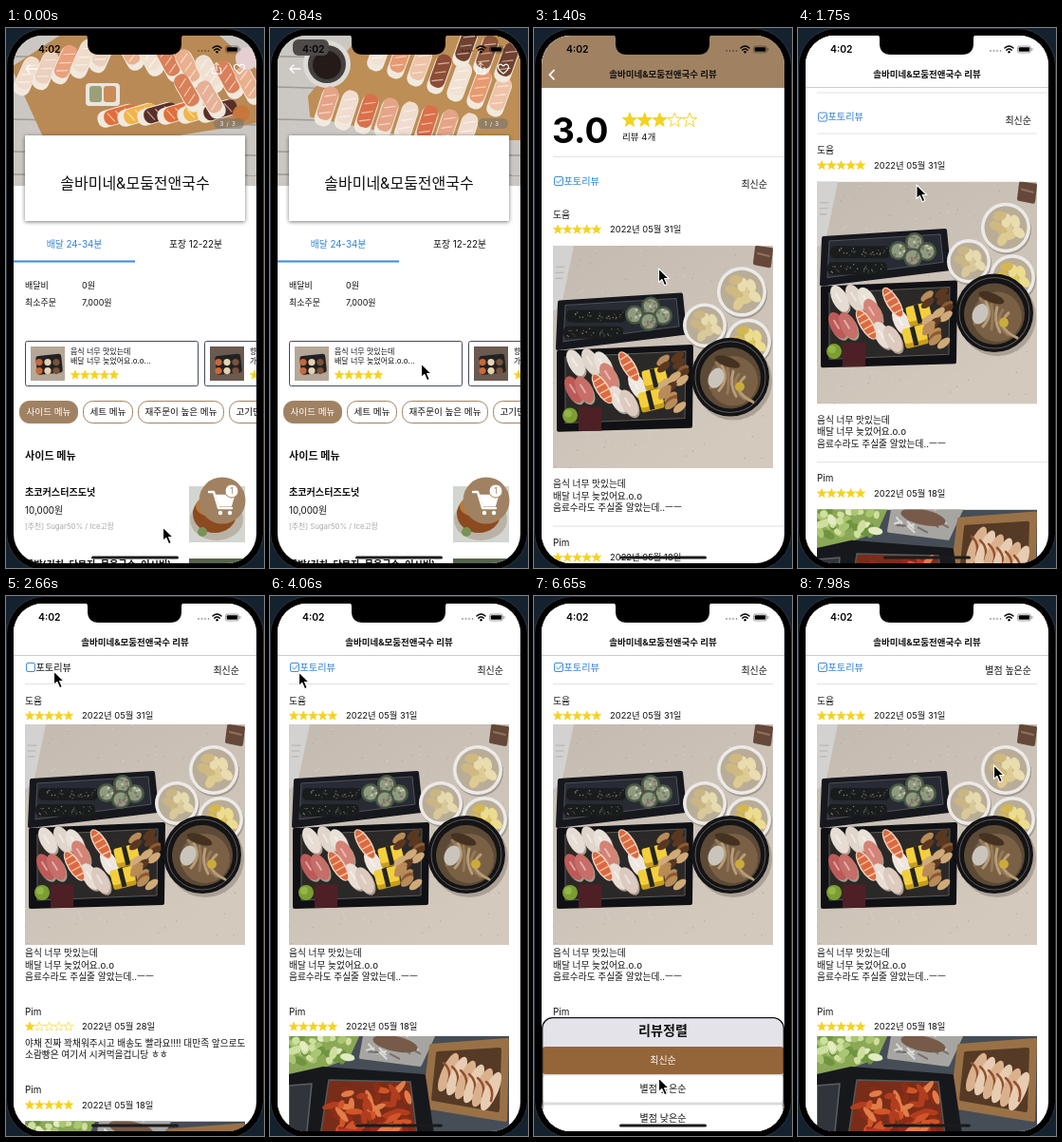
An HTML page that plays this animation: 272 by 568 pixels, repeating every 8000 ms.

```html
<!DOCTYPE html>
<html lang="ko">
<head>
<meta charset="utf-8">
<style>
html, body { margin: 0; width: 100%; height: 100%; overflow: hidden; background: #14202c; }
svg { display: block; }
#stage { width: 272px; height: 568px; }
text { font-family: Inter, "Noto Sans CJK KR", "Noto Sans CJK", sans-serif; white-space: pre; }
</style>
</head>
<body>
<svg id="stage" viewBox="0 0 272 568"></svg>
<script>
const LOOP = 8000, STEP = 70;
const BROWN = '#a08262', BLUE = '#2f80d8', YELLOW = '#f4d21f';
const SHOP = '솔바미네&amp;모둠전앤국수';

// ---- drawing helpers
const rect = (x, y, w, h, fill, r = 0, more = '') =>
  `<rect x="${x}" y="${y}" width="${w}" height="${h}" rx="${r}" fill="${fill}" ${more}/>`;
const circle = (x, y, r, fill, more = '') => `<circle cx="${x}" cy="${y}" r="${r}" fill="${fill}" ${more}/>`;
const oval = (x, y, rx, ry, fill, turn = 0) =>
  `<ellipse rx="${rx}" ry="${ry}" fill="${fill}" transform="translate(${x} ${y}) rotate(${turn})"/>`;
const poly = (points, fill, edge = fill, w = 4) =>
  `<polygon points="${points}" fill="${fill}" stroke="${edge}" stroke-width="${w}" stroke-linejoin="round"/>`;
const line = (d, color, w = 1) =>
  `<path d="${d}" fill="none" stroke="${color}" stroke-width="${w}" stroke-linecap="round" stroke-linejoin="round"/>`;
const rule = (x1, x2, y, color = '#e2e2e2') => rect(x1, y, x2 - x1, 1, color);
const group = (id, body, more = '') => `<g id="${id}" ${more}>${body}</g>`;
const shift = (x, y, body) => `<g transform="translate(${x} ${y})">${body}</g>`;
const repeat = (n, draw) => Array.from({ length: n }, (_, i) => draw(i)).join('');
// y is the middle of the line
const text = (x, y, str, size, { fill = '#111', weight = 400, anchor = 'start' } = {}) =>
  `<text x="${x}" y="${(y + size * .36).toFixed(2)}" font-size="${size}" fill="${fill}" font-weight="${weight}" text-anchor="${anchor}">${str}</text>`;

let seed = 7;
const random = () => (seed = seed * 16807 % 2147483647) / 2147483647;
const between = (a, b) => +(a + random() * (b - a)).toFixed(1);
const pick = list => list[Math.floor(random() * list.length)];

function star(x, y, r, full) {
  const pts = Array.from({ length: 10 }, (_, i) => {
    const a = (i / 5 - .5) * Math.PI, d = i % 2 ? r * .42 : r;
    return `${(x + d * Math.cos(a)).toFixed(2)},${(y + d * Math.sin(a)).toFixed(2)}`;
  }).join(' ');
  return `<polygon points="${pts}" fill="${full ? YELLOW : '#fff'}" stroke="${YELLOW}" stroke-width="${r * .12}"/>`;
}
const stars = (x, y, pitch, score) => repeat(5, i => star(x + pitch * (i + .5), y, pitch * .5, i < score));

// ---- food pictures
const nigiri = (x, y, turn, color) => `<g transform="translate(${x} ${y}) rotate(${turn})">
  ${rect(-9, -20, 18, 42, '#f1e9de', 8)}${rect(-8, -21, 16, 36, color, 7)}
  ${line('M-5-9l10-5M-5 1l10-5M-5 10l10-5', '#ffffff90', 1.2)}</g>`;
const nigiriRow = (n, x, y, dx, dy, turn, colors) =>
  repeat(n, i => nigiri(x + dx * i, y + dy * i, turn, colors[i % colors.length]));
const planks = ox => rect(ox, 8, 256, 158, '#cbc8c3') +
  [30, 62, 96, 130, 154].map(y => line(`M${ox} ${y}l256 ${y % 9}`, '#9d9a95', 1.5)).join('');

const heroFirst = planks(8) + poly('8,42 60,8 222,8 264,46 264,98 150,116 40,112', '#b98a55') +
  nigiriRow(5, 22, 50, 20, -6, 24, ['#f0dccb', '#ead0bd', '#e8a17c']) +
  nigiriRow(7, 130, 24, 21, 6, -28, ['#e9b08e', '#f0e0d0', '#d9805a']) +
  rect(84, 58, 36, 24, '#e9e5df', 4) + rect(88, 61, 13, 17, '#9aa077', 3) + rect(103, 61, 13, 17, '#c98b57', 3) +
  nigiriRow(6, 118, 92, 21, -1, 74, ['#e06f3c', '#f0b54a', '#5a2f28']) +
  nigiriRow(2, 192, 68, 24, 7, -30, ['#d98058', '#e6b197']) +
  circle(254, 32, 12, '#e6cfd2') + circle(248, 90, 9, '#c8763c');
const heroSecond = planks(264) + poly('354,8 520,8 520,116 420,116 300,92 298,72', '#bd8e55') +
  circle(316, 38, 25, '#dedbd7') + circle(316, 38, 20, '#44403e') + circle(316, 39, 15, '#241a17') +
  rect(280, 12, 38, 17, '#4d4a48', 6) +
  nigiriRow(8, 316, 82, 21, 4, 18, ['#e5a487', '#f0ddd0', '#d9704a']) +
  nigiriRow(7, 372, 24, 21, 8, 20, ['#f1e2d4', '#e89a70', '#eec3a8', '#8c4d35']) +
  nigiriRow(3, 462, 20, 22, 8, 20, ['#70412e', '#8b5439']);

const cup = (x, y, r, colors) => circle(x + 1, y + 2, r, '#a59a8f') + circle(x, y, r, '#eceae8') +
  circle(x, y, r - 3.5, '#b9ad98') +
  repeat(9, i => oval(x + Math.cos(i * 2.4) * r * .17 * Math.sqrt(i * 1.4), y + Math.sin(i * 2.4) * r * .17 * Math.sqrt(i * 1.4),
    r * .28, r * .19, colors[i % colors.length], i * 50));
const shrimp = (x, y) => oval(x, y, 7, 18, '#f0d9c6', -32) + oval(x, y, 5.5, 17, '#dc6a41', -32) +
  line(`M${x - 9} ${y - 7}l8-5M${x - 6} ${y - 1}l9-5M${x - 2} ${y + 5}l9-5M${x + 2} ${y + 11}l8-4`, '#f4cbb0', 1.4);
const tamago = (x, y) => `<g transform="translate(${x} ${y}) rotate(-14)">${rect(-12, -9, 25, 20, '#c99d1c', 3)}` +
  `${rect(-12, -10, 25, 16, '#f3cf3b', 3)}${rect(-3, -10, 5, 20, '#23241f')}</g>`;

function sushiPhoto() {
  const specks = repeat(160, () => circle(between(0, 232), between(0, 232), .7, pick(['#b3a79b', '#ded5cb'])));
  const roll = (x, y) => rect(x, y, 63, 13, '#191c1c', 5) +
    repeat(30, () => circle(between(x + 3, x + 60), between(y + 2, y + 11), .7, pick(['#5d6158', '#8b8a7a', '#3d443c'])));
  return `<linearGradient id="table" x2=".6" y2="1"><stop stop-color="#c3bab1"/><stop offset="1" stop-color="#d3c9bd"/></linearGradient>` +
    rect(0, 0, 232, 232, 'url(#table)') + specks +
    poly('0,0 20,0 7,62 0,66', '#d3d2d0') + line('M3 22h9M3 28h8M3 34h7', '#b3b0ae') +
    poly('215,2 230,4 228,21 213,18', '#65483a') + line('M216 8l12 3', '#94705c', 2) +
    poly('7,59 135,51 139,91 5,107', '#17181e') + poly('13,62 130,55 133,84 11,100', '#282b33', '#4d5159', 1) +
    roll(14, 67) + roll(11, 84) +
    [[86, 72], [103, 63], [116, 73], [101, 79]].map(([x, y]) => circle(x, y, 10, '#4a5746') + circle(x, y, 7.5, '#8e9b7f') +
      repeat(7, () => circle(x + between(-6, 6), y + between(-6, 6), 1.4, pick(['#c5c2a8', '#6f7a5e', '#8e6c70'])))).join('') +
    poly('6,111 146,105 145,188 6,192', '#101115') + poly('13,116 140,110 139,180 13,185', '#2b2927', '#5c5a58', 1) +
    [[24, 122, '#e5ddd4'], [40, 121, '#e0d5cb'], [53, 124, '#e9e2d9'], [22, 150, '#bd5a58'], [33, 150, '#c66e67'], [59, 136, '#d48476'],
      [69, 160, '#e9ddd5'], [80, 164, '#ddcabf'], [89, 146, '#efe7df']]
      .map(([x, y, c]) => oval(x + 1.5, y + 2, 8, 15, '#a99c8f', -28) + oval(x, y, 8, 15, c, -28) + line(`M${x - 4} ${y - 5}l5 8`, '#ffffff70', 2)).join('') +
    shrimp(52, 149) + shrimp(80, 126) + tamago(107, 138) + tamago(103, 161) +
    repeat(16, i => oval(between(116, 138), 116 + i * 3.5, 8, 4, pick(['#8c5a31', '#b98b59', '#5b3820', '#d0aa78']), -38)) +
    circle(18, 177, 8, '#7c9e31') + circle(16, 175, 4, '#94b548') + rect(27, 168, 24, 25, '#4d2025') +
    cup(199, 48, 26, ['#decb93', '#cfb981', '#e9dcae']) + cup(160, 83, 23, ['#d9c899', '#cab685', '#e6daae']) +
    cup(206, 100, 24, ['#e0c75e', '#d5b750', '#ecdc8e']) +
    circle(190, 141, 41, '#aca196') + circle(187, 137, 41, '#141416') + circle(187, 137, 37, '#141416', 'stroke="#5c5a58" stroke-width="1"') +
    circle(187, 138, 32, '#5d4a36') + circle(190, 141, 26, '#7a6044') +
    repeat(6, i => line(`M${172 + i * 6} ${122 + i * 3}q${14 - i * 6} 14 ${i * 3 - 6} 26`, i % 2 ? '#b79c77' : '#94795a', 3)) +
    oval(172, 138, 8, 11, '#c9c5bd', 25) + circle(197, 147, 5, '#c9ac3c') + oval(184, 121, 14, 5, '#44311f', 20);
}
function chickenPhoto() {
  return rect(0, 0, 232, 232, '#454d57') +
    poly('0,0 72,0 62,22 34,32 0,38', '#8aa856') +
    repeat(40, () => oval(between(0, 64), between(0, 27), between(3, 8), 4, pick(['#cfdf9e', '#a9c671', '#6f9440', '#e3ebc2']), between(0, 180))) +
    poly('80,0 152,0 138,30 76,22', '#a7a5a2') +
    repeat(16, () => line(`M${between(82, 140)} ${between(0, 20)}l${between(4, 12)} ${between(-4, 7)}`, pick(['#dddbd8', '#77716c']), 2)) +
    oval(112, 8, 24, 8, '#775a49', 12) +
    poly('150,10 230,4 228,88 142,74', '#9a7146') + poly('157,18 222,14 220,78 152,66', '#553a26') +
    repeat(6, i => oval(168 + i * 9, 38 + i * 4, 7, 22, i % 2 ? '#e6cdb2' : '#d9b18d', 24) +
      line(`M${163 + i * 9} ${28 + i * 4}q9 8 5 20`, '#95502f', 2.5)) +
    poly('0,42 36,34 142,42 152,110 0,110', '#17181c') + poly('42,46 128,48 136,112 32,112', '#792d18', '#55585d', 1.5) +
    repeat(60, () => oval(between(44, 126), between(53, 112), between(5, 11), 3.2, pick(['#d2552a', '#b23d1e', '#e07d48', '#8e2d17']), between(0, 180))) +
    poly('0,52 24,50 18,110 0,110', '#30343b', '#5a5e64', 1.5);
}
const food = (x, y, size, base) => rect(x, y, size, size, base) +
  rect(x + 4, y + size * .3, size - 9, size * .55, '#222225', 3, `transform="rotate(-6 ${x} ${y})"`) +
  repeat(6, i => circle(x + 9 + i % 3 * 9, y + size * .46 + (i > 2) * 9, 3.6, ['#c8693c', '#e6d2b0', '#79523a'][i % 3]));

// ---- menu page
const chip = (x, w, label, on) => rect(x + .5, 392.5, w, 23, on ? BROWN : '#fff', 10, `stroke="${BROWN}"`) +
  text(x + 7.5, 404, label, 9.6, { fill: on ? '#fff' : '#111' });
const cart = circle(228, 497, 24.5, BROWN) +
  line('M214 488h5l5 17h14M220 492h20l-3 10h-14', '#fff', 2.4) +
  `<path d="M221 492h19l-3 9h-13z" fill="#fff"/>` + circle(226, 510, 2.2, '#fff') + circle(236, 510, 2.2, '#fff') +
  circle(238, 487, 7, '#fff', `stroke="${BROWN}"`) + text(238, 487, '1', 9, { fill: BROWN, anchor: 'middle' });

const menuPage = rect(8, 8, 256, 556, '#fff') +
  `<svg x="8" y="8" width="256" height="158" viewBox="8 8 256 158">${group('hero', heroFirst + heroSecond)}</svg>` +
  line('M32 43H21M25 39l-4 4 4 4', '#fff', 1.3) +
  line('M219 42h-1.500v6h9v-6h-1.500M222 45v-8M219.500 39l2.500-2.500 2.500 2.500', '#fff', 1) +
  line('M246 48c-9-6-5-11-1.800-9.500l1.800 1.500 1.800-1.500c3.200-1.500 7.200 3.500-1.800 9.500z', '#fff', 1.2) +
  rect(219, 95, 32, 11, '#77737199', 5.5) +
  `<text id="pageNo" x="234" y="102.500" font-size="6" fill="#fff" text-anchor="middle" letter-spacing=".8"></text>` +
  rect(20, 113, 232, 90, '#fff', 1, 'style="filter:drop-shadow(0 1px 2px #0008)"') +
  text(136, 163, SHOP, 16, { anchor: 'middle' }) +
  text(72, 227, '배달 24-34분', 9.8, { fill: BLUE, anchor: 'middle' }) + text(200, 227, '포장 12-22분', 9.8, { anchor: 'middle' }) +
  rect(8, 244.5, 128, 2, '#3c87e6') +
  text(20, 271, '배달비', 9) + text(80, 271, '0원', 9) + text(20, 289, '최소주문', 9) + text(80, 289, '7,000원', 9) +
  rect(20.5, 329.5, 182, 47, '#fff', 2, 'stroke="#444a55"') + food(26, 335, 36, '#b5a797') +
  text(68, 340, '음식 너무 맛있는데', 8) + text(68, 350.5, '배달 너무 늦었어요.o.o...', 8) + stars(68, 365, 10.2, 5) +
  rect(209.5, 329.5, 182, 47, '#fff', 2, 'stroke="#444a55"') + food(215, 335, 36, '#6a5a50') +
  text(257, 340, '향', 8) + text(257, 350.5, '가', 8) + stars(257, 365, 10.2, 5) +
  chip(14, 61, '사이드 메뉴', true) + chip(81, 52, '세트 메뉴') + chip(139, 90, '재주문이 높은 메뉴') + chip(235, 60, '고기만 메뉴') +
  text(20, 450, '사이드 메뉴', 11.1, { weight: 700 }) +
  text(20, 488, '초코커스터즈도넛', 10.1, { weight: 700 }) + text(20, 507, '10,000원', 9.8) +
  text(20, 524, '[추천] Sugar50% / Ice고정', 7.8, { fill: '#aaa' }) +
  rect(193, 482, 59, 59, '#d3d6d0') + oval(222, 517, 28, 22, '#b9b2a6') + oval(220, 511, 23, 20, '#8c4a20') + oval(217, 503, 17, 11, '#b47a40') + circle(207, 530, 5, '#789256') +
  text(20, 564, '국밥(김치, 단무지, 묵은국수, 어시비)', 10.1, { weight: 700 }) +
  rect(193, 558, 59, 8, '#56644d') + cart;

// ---- review page
function review(y, name, score, day, { photo, lines = [], gap = 9 }) {
  const height = gap > 10 ? 234 : 232, top = y + 16 + gap;
  const first = photo ? top + height + gap : y + 33.5;
  return text(20, y, name, 9.8) + stars(20, y + 16, 10.2, score) + text(80, y + 16, `2022년 05월 ${day}일`, 9.4) +
    (photo ? `<svg x="20" y="${top}" width="232" height="${height}" viewBox="0 0 232 232" preserveAspectRatio="none">${photo}</svg>` : '') +
    lines.map((s, i) => text(20, first + i * 12.3, s, 9.7)).join('');
}
const sushi = sushiPhoto(), chicken = chickenPhoto();
const meal = ['음식 너무 맛있는데', '배달 너무 늦었어요.o.o', '음료수라도 주실줄 알았는데..ㅡㅡ'];
const salad = ['야채 진짜 꽉채워주시고 배송도 빨라요!!!! 대만족 앞으로도', '소람빵은 여기서 시켜먹을겁니당 ㅎㅎ'];
const topReview = review(110, '도윰', 5, 31, { photo: sushi, lines: meal });

const looseList = review(196, '도윰', 5, 31, { photo: sushi, lines: meal, gap: 17 }) + rule(20, 264, 523.5) +
  review(541, 'Pim', 5, 18, { photo: chicken, gap: 17 });
const fullList = shift(0, 86, topReview + review(437, 'Pim', 1, 28, { lines: salad }) +
  review(519.5, 'Pim', 5, 18, { photo: chicken, gap: 17 }));
const photoList = shift(0, 86, topReview + review(437, 'Pim', 5, 18, { photo: chicken, gap: 10 }));

const filterBar = rect(8, 140, 256, 39, '#fff') + group('barLine', rule(20, 252, 178)) +
  rect(21.5, 156.5, 9, 9, '#fff', 1.5, `stroke="${BLUE}" stroke-width=".9"`) + group('tick', line('M23.700 161l1.800 2.200 3.800-4.400', BLUE, .9)) +
  `<text id="filter" x="31.500" y="164.700" font-size="10.200">포토리뷰</text>` +
  `<text id="sort" x="246" y="168.300" font-size="10" fill="#111" text-anchor="end"></text>`;

const reviewPage = rect(8, 8, 256, 556, '#fff') +
  group('scroll',
    text(19, 108, '3.0', 37, { weight: 700, fill: '#000' }) + stars(93, 97, 15.8, 3) + text(93, 115, '리뷰 4개', 9.6) + rule(20, 264, 135) +
    group('loose', looseList) + group('full', fullList) + group('photos', photoList) + filterBar) +
  `<rect id="bar" x="8" y="8" width="256" height="55"/>` + group('navLine', rule(8, 264, 62, '#ccc')) +
  line('M21 44.500l-4.500 4.700 4.500 4.700', '#fff', 1.8) + text(136, 49, SHOP + ' 리뷰', 9.5, { weight: 700, anchor: 'middle' });

const option = (y, label, on) => rect(8.5, y, 255, 29, on ? '#946538' : '#fff', 4, on ? '' : 'stroke="#dcdcdc"') +
  text(136, y + 14.5, label, 10, { fill: on ? '#fff' : '#111', anchor: 'middle' });
const sheet = rect(8.5, 443.5, 255, 150, '#e4e3e9', 11) +
  rect(8, 474, 256, 100, '#d9d9db') +
  text(136, 457, '리뷰정렬', 14.1, { weight: 700, anchor: 'middle' }) +
  option(474, '최신순', true) + option(504, '별점 높은순') + option(535, '별점 낮은순') +
  rect(8.7, 443.7, 254.6, 150, 'none', 11, 'stroke="#111" stroke-width="1.300"');

const statusBar = text(34, 22.5, '4:02', 10.4, { weight: 600, fill: '#000' }) +
  repeat(4, i => circle(203 + i * 3.5, 24, .9, '#0006')) +
  line('M218 21q4.500-4 9 0M219.800 23.200q2.700-2.400 5.400 0', '#000', 1.5) + circle(222.5, 25.2, 1.2, '#000') +
  rect(231.5, 19, 14, 7, 'none', 2, 'stroke="#0007" stroke-width=".8"') + rect(232.7, 20.2, 11.6, 4.6, '#000', 1) + rect(246.4, 21.3, 1, 2.5, '#0007');

document.getElementById('stage').innerHTML =
  `<clipPath id="screen"><rect x="8" y="8" width="256" height="555" rx="31"/></clipPath>` +
  rect(0, 0, 272, 568, '#14222f') + rect(.5, .5, 271, 570, '#000', 40, 'stroke="#2c343c"') +
  group('phone', group('menu', menuPage) + group('reviews', reviewPage) + group('sheet', sheet) + statusBar +
    rect(90, 555.5, 92, 3, '#1b1b1b', 1.5), 'clip-path="url(#screen)"') +
  `<path d="M82 7q4 0 4 4v5q0 12 12 12h75q12 0 12-12v-5q0-4 4-4z"/>` +
  group('cursor', `<circle id="ring" r="21.500" fill="none" stroke="#222" stroke-width="1.600"/>` +
    `<path d="M0 0v14.500l3.400-3 2.700 6.200 2.700-1.200-2.700-6h4.600z" stroke="#fff" stroke-width="1.100" stroke-linejoin="round"/>`);

// ---- motion
const parts = Object.fromEntries([...document.querySelectorAll('[id]')].map(e => [e.id, e]));
const move = (id, x, y) => parts[id].setAttribute('transform', `translate(${x.toFixed(2)} ${y.toFixed(2)})`);
const show = (id, on) => { parts[id].style.display = on ? '' : 'none'; };
const progress = (t, from, to) => Math.min(1, Math.max(0, (t - from) / (to - from)));
const smooth = p => p * p * (3 - 2 * p);
const easeOut = p => 1 - (1 - p) ** 3;
const within = (t, spans) => spans.some(([a, b]) => t >= a && t < b);

const cursorPath = [
  [0, 165, 525], [140, 165, 515], [490, 162, 420], [700, 160, 362], [840, 159, 353], [1050, 159, 353], [1400, 131, 253],
  [1470, 131, 250], [1680, 127, 170], [1820, 122, 160], [2100, 70, 100], [2310, 50, 79], [2730, 50, 79],
  [3010, 74, 120], [3080, 74, 120], [3360, 36, 93], [3430, 36, 93], [3710, 30, 80], [4270, 30, 80], [4340, 29, 79],
  [4970, 29, 79], [5110, 62, 125], [5250, 140, 166], [5390, 220, 128], [5460, 237, 96], [5600, 238, 83],
  [5880, 238, 83], [6090, 220, 200], [6370, 160, 440], [6650, 131, 507], [6790, 131, 508], [7000, 134, 515],
  [7280, 134, 515], [7490, 155, 420], [7770, 196, 220], [7980, 206, 178], [LOOP, 206, 178]];
const clicks = [[910, 1050], [1470, 1680], [2520, 2660], [3920, 4060], [5740, 5880], [7140, 7280]];

function cursorAt(t) {
  const i = Math.max(1, cursorPath.findIndex(k => k[0] >= t));
  const [t0, x0, y0] = cursorPath[i - 1], [t1, x1, y1] = cursorPath[i];
  const p = progress(t, t0, t1);
  return [x0 + (x1 - x0) * p + .5, y0 + (y1 - y0) * p];
}

function render(t) {
  const slide = smooth(progress(t, 70, 560));
  move('hero', -256 * slide, 0);
  parts.pageNo.textContent = slide < .5 ? '3 / 3' : '1 / 3';

  const push = easeOut(progress(t, 980, 1400));
  move('menu', -77 * push, 0);
  move('reviews', 256 * (1 - push), 0);

  const offset = 86 * easeOut(progress(t, 1470, 2170));
  const scrolled = offset > 0;
  move('scroll', 0, -offset);
  parts.bar.setAttribute('fill', scrolled ? '#fff' : BROWN);
  show('navLine', scrolled);
  show('barLine', scrolled);

  const unchecked = t >= 2590 && t < 4060;
  show('loose', t < 2590);
  show('full', unchecked);
  show('photos', t >= 4060);
  show('tick', !unchecked);
  parts.filter.setAttribute('fill', unchecked ? '#111' : BLUE);
  parts.sort.textContent = t < 7280 ? '최신순' : '별점 높은순';

  const lift = easeOut(progress(t, 5810, 6300)) - smooth(progress(t, 7210, 7630));
  move('sheet', 0, 125 * (1 - lift));

  move('cursor', ...cursorAt(t));
  show('ring', within(t, clicks));
}

const start = performance.now();
function tick(now) {
  const t = Math.max(0, now - start) % LOOP;
  render(Math.floor(t / STEP) * STEP);
  requestAnimationFrame(tick);
}
render(0);
requestAnimationFrame(tick);
</script>
</body>
</html>
```
